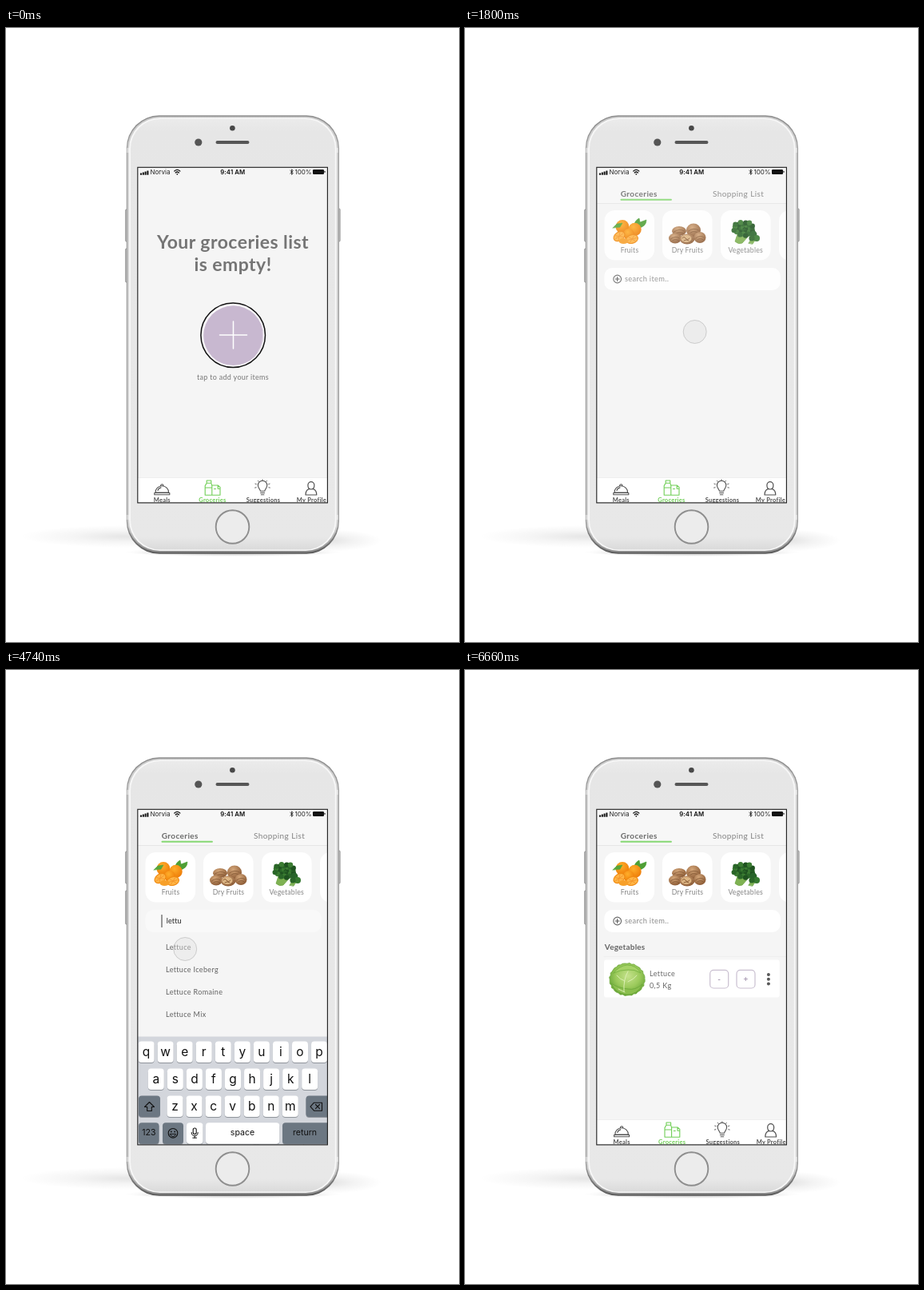
These frames come from a looping animation (567x768 px, 7800 ms). An HTML page:

```html
<!DOCTYPE html>
<html lang="en">
<head>
<meta charset="utf-8">
<title>Groceries</title>
<style>
html, body { margin: 0; width: 100%; height: 100%; overflow: hidden; background: #fff; }
svg { display: block; width: 567px; height: 768px; }
text { font-family: Lato, "Open Sans", sans-serif; }
.sys { font-family: Inter, Roboto, sans-serif; }
</style>
</head>
<body>
<svg viewBox="0 0 567 768" xmlns="http://www.w3.org/2000/svg">
  <defs>
    <clipPath id="screenClip"><rect x="165" y="174.5" width="237" height="419"/></clipPath>
    <linearGradient id="bodyFill" x1="0" y1="0" x2="0" y2="1">
      <stop offset="0" stop-color="#ebebeb"/><stop offset=".03" stop-color="#e6e6e6"/>
      <stop offset=".97" stop-color="#e8e8e8"/><stop offset="1" stop-color="#dadada"/>
    </linearGradient>
    <linearGradient id="edgeFill" x1="0" y1="0" x2="0" y2="1">
      <stop offset="0" stop-color="#8c8c8c"/><stop offset=".08" stop-color="#9c9c9c"/>
      <stop offset=".92" stop-color="#9c9c9c"/><stop offset="1" stop-color="#5c5c5c"/>
    </linearGradient>
    <linearGradient id="rimFill" x1="0" y1="0" x2="0" y2="1">
      <stop offset="0" stop-color="#c9c9c9"/><stop offset=".07" stop-color="#d2d2d2"/>
      <stop offset=".94" stop-color="#d2d2d2"/><stop offset="1" stop-color="#8d8d8d"/>
    </linearGradient>
    <radialGradient id="shade">
      <stop offset="0" stop-color="#000" stop-opacity=".2"/>
      <stop offset=".5" stop-color="#000" stop-opacity=".08"/>
      <stop offset="1" stop-color="#000" stop-opacity="0"/>
    </radialGradient>
    <radialGradient id="orange" cx=".4" cy=".3" r=".7">
      <stop offset="0" stop-color="#ffae2a"/><stop offset="1" stop-color="#ee7d08"/>
    </radialGradient>
    <radialGradient id="nut" cx=".4" cy=".3" r=".7">
      <stop offset="0" stop-color="#d4a679"/><stop offset="1" stop-color="#8d5c36"/>
    </radialGradient>
    <radialGradient id="leaf" cx=".52" cy=".4" r=".62">
      <stop offset="0" stop-color="#c5e28c"/><stop offset=".55" stop-color="#9bca5b"/>
      <stop offset="1" stop-color="#5f9f31"/>
    </radialGradient>
  </defs>

  <g id="phone"></g>
  <g clip-path="url(#screenClip)">
    <rect x="165" y="174" width="237" height="420" fill="#f5f5f5"/>
    <g id="emptyText"></g>
    <g id="list"></g>
    <g id="addButton"></g>
    <g id="tabBar"></g>
    <g id="keyboard"></g>
    <circle id="touch" r="14.5" fill="rgba(224,224,224,.42)" stroke="rgba(150,150,150,.4)"/>
    <g id="status"></g>
  </g>
  <rect x="164.8" y="174.3" width="237.6" height="419.6" fill="none" stroke="#1c1c1c" stroke-width="1.1"/>
</svg>
<script>
const $ = id => document.getElementById(id);
const LOOP = 7800, STEP = 30;

// Markup helpers
const rect = (x, y, w, h, r, fill, more = '') =>
  `<rect x="${x}" y="${y}" width="${w}" height="${h}" rx="${r}" fill="${fill}" ${more}/>`;
const dot = (x, y, r, fill, more = '') => `<circle cx="${x}" cy="${y}" r="${r}" fill="${fill}" ${more}/>`;
const oval = (x, y, rx, ry, fill, more = '') =>
  `<ellipse cx="${x}" cy="${y}" rx="${rx}" ry="${ry}" fill="${fill}" ${more}/>`;
const line = (d, stroke, w = 1, fill = 'none') =>
  `<path d="${d}" fill="${fill}" stroke="${stroke}" stroke-width="${w}" stroke-linecap="round" stroke-linejoin="round"/>`;
const text = (str, x, y, size, fill, { bold = 400, gap = .3, mid = false, sys = false } = {}) =>
  `<text x="${x}" y="${y}" font-size="${size}" fill="${fill}" font-weight="${bold}" letter-spacing="${gap}"` +
  `${mid ? ' text-anchor="middle"' : ''}${sys ? ' class="sys"' : ''}>${str}</text>`;

function drawPhone() {
  const sideButton = (x, y, h) => rect(x, y, 3, h, 1, '#c4c4c4', 'stroke="#868686" stroke-width=".7"');
  const bands = [150, 609].map(y => rect(151.5, y, 3, 6, 0, '#e2e2e2') + rect(412.8, y, 3, 6, 0, '#e2e2e2')).join('');
  return oval(150, 636, 132, 14, 'url(#shade)', 'opacity=".5"') +
    oval(400, 641, 70, 14, 'url(#shade)', 'opacity=".6"') +
    oval(284, 655.5, 136, 6, 'url(#shade)') + oval(284, 656.5, 126, 4, 'url(#shade)') +
    sideButton(149.5, 227, 40) + sideButton(149.5, 276, 42) + sideButton(415.2, 226, 41) +
    rect(150.8, 109.3, 266.2, 548.5, 41, 'url(#edgeFill)') +
    rect(152, 110.7, 263.8, 545, 40, 'url(#rimFill)') + bands +
    rect(154, 112.3, 259.8, 541.7, 38.5, '#f7f7f7') +
    rect(156, 114, 255.8, 538.6, 37, 'url(#bodyFill)') +
    dot(283.4, 125.2, 3.3, '#484848') +
    dot(240.8, 143, 4.6, '#555') +
    rect(262.5, 140.9, 42, 4.2, 2.1, '#565656') +
    dot(283.5, 624, 20.8, '#ececec', 'stroke="#8e8e8e" stroke-width="1.9"');
}

function drawStatus() {
  const bars = [0, 1, 2, 3].map(i => rect(168 + i * 2.8, 181.4 - i, 2, 2.4 + i, .4, '#111')).join('');
  const sys = { sys: true, gap: 0 };
  return bars + text('Norvia', 180.5, 183, 8, '#222', sys) +
    line('M210.8 179q3.5-3.2 7 0M212.2 181q2.1-2 4.2 0', '#111', 1.2) + dot(214.3, 182.8, .9, '#111') +
    text('9:41 AM', 283.8, 183, 7.8, '#111', { sys: true, gap: .1, mid: true, bold: 600 }) +
    line('M355.8 178.3l3.6 3.3-1.8 1.8v-6.6l1.8 1.8-3.6 3.3', '#111', .8) +
    text('100%', 361.5, 183, 8, '#222', sys) +
    rect(384, 177, 14, 6, 1.2, '#111') + rect(398.5, 178.8, 1, 2.4, .4, '#333');
}

function drawEmptyText() {
  const head = { bold: 700, gap: .45, mid: true };
  return text('Your groceries list', 284, 276, 23, '#757575', head) +
    text('is empty!', 284, 303.5, 23, '#757575', head) +
    text('tap to add your items', 284, 440, 9, '#777', { mid: true });
}

function drawAddButton() {
  return '<g id="disc">' + dot(0, 0, 40.3, '#f7f5f8', 'stroke="#111" stroke-width="1.5"') +
    dot(.4, .4, 37.4, '#c8b8d0') +
    line('M-31 -22A38 38 0 0 1 9 -37', '#fff', 1) + line('M37 -5A37 37 0 0 1 31 21', '#e6dde9', .8) + '</g>' +
    '<g id="plus">' + line('M-17 0H17M0 -17V17', '#fff', 1.5) + '</g>';
}

function drawTabBar() {
  const ink = '#505050', green = '#6fce55';
  const label = (str, x, fill) => text(str, x, 592.8, 7.5, fill, { mid: true, bold: 700, gap: .25 });
  let rays = '';
  for (let i = 0; i < 7; i++) {
    const a = Math.PI * (.92 + i * 1.16 / 6), c = Math.cos(a), s = Math.sin(a);
    rays += `M${321 + 8.2 * c} ${573 + 7 * s}l${1.5 * c} ${1.2 * s}`;
  }
  return rect(160, 562.5, 250, 32, 0, '#fff') + line('M160 562.5H410', '#ececec', .8) +
    line('M187 581a8.3 8.3 0 0 1 16.6 0zM185.8 581.5h19v2.2h-19zM193.6 572.5a1.7 1.7 0 1 1 3.4 0M190 578.5q1-3 4-3.6', ink, 1.1) +
    label('Meals', 195.3, ink) +
    line('M251.2 566h5.6v3.2h-5.6zM251.2 569.2l-2 3.4v11.6h8.6v-11.6l-1-3.4M249.2 575h8.6M257.8 572h7.4l2.8 2.4v9.8h-10.2M265.2 572v4.2h2.8M260.5 576.5h2', green, 1.1) +
    label('Groceries', 258.4, green) +
    line('M318.4 579.3c0-2.4-3-3.4-3-7.3a5.7 5.7 0 0 1 11.4 0c0 3.9-3 4.9-3 7.3zM318.6 581.5h5M319.3 583.8h3.6', ink, 1.1) +
    line(rays, ink, .9) + label('Suggestions', 322, ink) +
    line('M377.9 572a4 4.4 0 1 1 8 0c0 3-1.7 5-4 5s-4-2-4-5zM379.4 576.6c-3 .8-4.4 3-4.4 7.4h13.8c0-4.4-1.4-6.6-4.4-7.4', ink, 1.2) +
    label('My Profile', 382.4, ink);
}

function drawOranges() {
  const slice = (x, y, turn) => `<g transform="translate(${x} ${y}) rotate(${turn})">` +
    oval(0, 0, 8.2, 5.8, '#f08a12') + oval(0, 0, 7, 4.7, '#ffb545') +
    line('M-6 0H6M-3.5 -3.4L3.5 3.4M3.5 -3.4L-3.5 3.4', '#f3942a', .8) + '</g>';
  return line('M211 248q2-8 7-10l1 5 8-3q0 8-9 10z', '#3f9a2c', .6, '#4f9f35') +
    dot(197, 248.5, 8.4, 'url(#orange)') + dot(212.5, 252, 8.2, 'url(#orange)') +
    dot(205, 258, 7, 'url(#orange)') +
    slice(193, 260.5, -35) + slice(209, 264, -14) + oval(198.5, 266.5, 6, 3.6, '#f7a02a') +
    line('M185 250l5-5 7-1-3 5z', '#4da336', .5, '#57a63a');
}

function drawWalnuts() {
  const nuts = [[268, 254, 9, 6], [286, 253, 9, 8.5], [294, 262, 7.5, 7], [263, 263, 8, 6.5], [278, 264, 9.5, 6.5]];
  return nuts.map(([x, y, rx, ry]) => oval(x, y, rx, ry, 'url(#nut)') +
    line(`M${x - rx * .7} ${y + 1}q${rx * .7} -5 ${rx * 1.4} -1M${x - rx * .4} ${y + 3}q${rx * .4} -3 ${rx} 0`, '#7f5431', .7)).join('') +
    oval(277, 263.5, 6.5, 4.6, '#ddb684') + line('M272 263q2-3 4 0t5 0M274 265.8q3-2 6 0', '#8a5c36', 1);
}

function drawBroccoli() {
  let out = line('M341 258l-3 9q4 4 9 2l8-9z', '#6fa544', .8, '#7fb253');
  for (let i = 0; i < 34; i++) {
    const a = i * 2.4, d = Math.sqrt(i / 34);
    const x = 349 + Math.cos(a) * 13.5 * d, y = 251 + Math.sin(a) * 9 * d;
    out += dot(x.toFixed(1), y.toFixed(1), 3.2, ['#2a6628', '#3b7c32', '#1f5220'][i % 3]);
  }
  return out + line('M355 269l4-6 5 1-4 6z', '#6da44a', .8, '#7fb253') +
    dot(361, 258, 4.4, '#28642a') + dot(365, 263, 4, '#367a30') + dot(359, 263, 3.6, '#2a6628');
}

function drawLettuce() {
  let edge = '';
  for (let i = 0; i <= 48; i++) {
    const a = i / 48 * 2 * Math.PI, r = 21 + Math.sin(i * 2.6) * .6;
    edge += `${i ? 'L' : 'M'}${(203 + r * Math.cos(a) * 1.05).toFixed(1)} ${(387 + r * Math.sin(a) * .96).toFixed(1)}`;
  }
  return line(edge + 'z', '#74ac43', .8, 'url(#leaf)') +
    line('M183 392q6 13 20 14 13 0 19-13-9 8-18 6-12-1-21-7z', '#6ba639', .8, '#8bbf4e') +
    line('M186 379q7-9 17-10 11 0 17 10-8-5-16-4-10 0-18 4z', '#74b03f', .8, '#a6d267') +
    line('M199 402q-1-15 5-25M204 390q7-3 11-8M200 389q-6-2-10-7M192 399q4 2 8 4', '#dcefb4', 1);
}

function drawList() {
  const cards = [174.5, 247, 320, 393].map(x => rect(x, 228, 62.6, 62.5, 13, '#fff')).join('');
  const name = (str, x) => text(str, x, 281, 8.7, '#858585', { mid: true, gap: .2 });
  const hits = ['Lettuce', 'Lettuce Iceberg', 'Lettuce Romaine', 'Lettuce Mix']
    .map((s, i) => text(s, 200, 350.3 + i * 27.8, 9, '#626262', { gap: .35 })).join('');
  const square = (x, sign) => rect(x, 375.4, 23, 22.6, 4.5, '#fff', 'stroke="#c9bfd0" stroke-width="1.2"') +
    text(sign, x + 11.5, 390, 10, '#a99ab3', { mid: true, bold: 700, gap: 0 });
  return rect(165, 174, 237, 45.5, 0, '#f7f7f7') + line('M165 219.5H402', '#e6e6e6', 1) +
    text('Groceries', 194.7, 210.5, 10, '#6b6b6b', { bold: 700, gap: .4 }) +
    text('Shopping List', 310, 210.5, 10, '#838383', { gap: .4 }) +
    rect(194.7, 213.7, 64, 2, .5, '#86d873') + cards +
    drawOranges() + drawWalnuts() + drawBroccoli() +
    name('Fruits', 206) + name('Dry Fruits', 278.5) + name('Vegetables', 351.2) +
    '<g id="field">' + rect(174.3, 300, 220.5, 28, 10, '#fff') + '</g>' +
    '<g id="hint">' + dot(190.7, 314, 4.9, 'none', 'stroke="#666" stroke-width="1.1"') +
    line('M188.3 314h4.8M190.7 311.6v4.8', '#555', 1.1) + text('search item..', 200, 317.3, 9.3, '#8a8a8a') + '</g>' +
    '<g id="typed">' + line('M195 306.5V321.5', '#555', 1.2) +
    text('lettu', 200.8, 317.3, 9, '#222', { gap: .1 }) + hits + '</g>' +
    '<g id="heading">' + text('Vegetables', 174.8, 349.8, 10, '#666', { bold: 700, gap: .2 }) + '</g>' +
    '<g id="item">' + line('M174 358.5H402', '#eee', 1) + rect(174, 362.5, 219.7, 47, 3, '#fff') + drawLettuce() +
    text('Lettuce', 231, 382.7, 9, '#666', { gap: .4 }) + text('0,5 Kg', 231, 397.7, 9, '#666', { gap: .35 }) +
    square(306.7, '-') + square(340, '+') +
    [381, 386.7, 392.4].map(y => dot(379.9, y, 2, '#585858')).join('') + '</g>';
}

function drawKeyboard() {
  const dark = '#6c7782';
  const key = (x, y, w, fill) => rect(x, y + 1, w, 26.4, 4, '#8f949b') + rect(x, y, w, 26.4, 4, fill);
  const row = (chars, x, y) => [...chars].map((c, i) => {
    const mid = x + i * 24.05;
    return key(mid - 10, y, 20, '#fff') + text(c, mid, y + 18.3, 15.5, '#111', { mid: true, sys: true, gap: 0 });
  }).join('');
  const word = (str, x) => text(str, x, 582.3, 10.6, '#111', { mid: true, sys: true, gap: 0 });
  return rect(165, 458.5, 238, 136, 0, '#d3d6dc') +
    row('qwertyuiop', 175.6, 464.5) + row('asdfghjkl', 187.8, 498.6) + row('zxcvbnm', 211.5, 532.6) +
    key(166, 532.6, 27, dark) + line('M179.5 540.5l6 6h-3.2v5h-5.6v-5h-3.2z', '#111', 1.1) +
    key(375.5, 532.6, 30, dark) +
    line('M381 546.2l4.5-5h10v10h-10zM387.5 543.5l5 5.2M392.5 543.5l-5 5.2', '#111', 1.1) +
    key(166, 566.3, 25.5, dark) + word('123', 178.8) +
    key(196, 566.3, 26, dark) + dot(209, 579.3, 5.8, 'none', 'stroke="#111" stroke-width="1.1"') +
    dot(206.8, 577.5, .9, '#111') + dot(211.2, 577.5, .9, '#111') + line('M205.5 580.4h7q-.8 3.2-3.5 3.2t-3.5-3.2z', '#111', .9) +
    key(226, 566.3, 20.5, '#fff') + rect(234.2, 573, 4, 7.5, 2, 'none', 'stroke="#111" stroke-width="1.1"') +
    line('M232.2 578.5q0 4.2 4 4.2t4-4.2M236.2 583v2.2M233.8 585.2h4.8', '#111', 1) +
    key(250, 566.3, 92.3, '#fff') + word('space', 296) +
    key(346, 566.3, 59, dark) + word('return', 374);
}

$('phone').innerHTML = drawPhone();
$('status').innerHTML = drawStatus();
$('emptyText').innerHTML = drawEmptyText();
$('addButton').innerHTML = drawAddButton();
$('tabBar').innerHTML = drawTabBar();
$('list').innerHTML = drawList();
$('keyboard').innerHTML = drawKeyboard();

// Motion helpers
const span = (t, a, b) => Math.min(1, Math.max(0, (t - a) / (b - a)));
const easeOut = (u, n = 3) => 1 - (1 - u) ** n;
const easeInOut = u => u < .5 ? 2 * u * u : 1 - 2 * (1 - u) ** 2;
const show = (id, alpha) => $(id).setAttribute('opacity', alpha);
const place = (id, value) => $(id).setAttribute('transform', value);
const shift = (id, x, y = 0) => place(id, `translate(${x} ${y})`);

// Each move: start, end, then the four points of a cubic curve
const moves = [
  [1920, 2820, [287.7, 380], [330, 340], [215, 288], [189, 313.8]],
  [4140, 4740, [189.5, 313.8], [215, 305], [285, 350], [224.2, 349]],
  [5670, 6420, [224.2, 349], [268, 415], [392, 310], [398, 185]]
];

function touchAt(t) {
  const move = moves.filter(m => t >= m[0]).pop() || moves[0];
  const [a, b, ...pts] = move;
  const u = easeInOut(span(t, a, b)), v = 1 - u;
  const mix = k => v ** 3 * pts[0][k] + 3 * v * v * u * pts[1][k] + 3 * v * u * u * pts[2][k] + u ** 3 * pts[3][k];
  return [mix(0), mix(1)];
}

function render(t) {
  const [x, y] = touchAt(t);
  shift('touch', x, y);
  show('touch', t < 6630 ? span(t, 720, 1050) : t < 6660 ? .4 : 0);

  show('emptyText', 1 - span(t, 1260, 1380));
  const grow = span(t, 1290, 1650) ** 2;
  place('disc', `translate(284.2 384.3) scale(${1 + grow * 1.9})`);
  place('plus', `translate(284.5 384) rotate(${grow * 60}) scale(${1 + grow * 1.9})`);
  show('addButton', 1 - span(t, 1470, 1680));
  show('list', easeOut(span(t, 1440, 2070), 2.4));

  const open = easeOut(span(t, 3420, 3720));
  const close = span(t, 5010, 5220);
  const typing = open * (1 - close);
  shift('keyboard', 0, 137 * (1 - open + close * close));
  show('typed', typing);
  show('hint', 1 - typing);
  show('field', 1 - typing * .6);

  const left = (1 - span(t, 5040, 5460)) ** 4;
  shift('heading', -90 * left);
  shift('item', -280 * left);
  const added = t >= 5040 ? 1 : 0;
  show('heading', added);
  show('item', added);
  shift('tabBar', added * .8);
}

const start = performance.now();
function tick(now) {
  const t = Math.max(0, now - start) % LOOP;
  render(Math.floor(t / STEP) * STEP);
  requestAnimationFrame(tick);
}
render(0);
requestAnimationFrame(tick);
</script>
</body>
</html>
```
